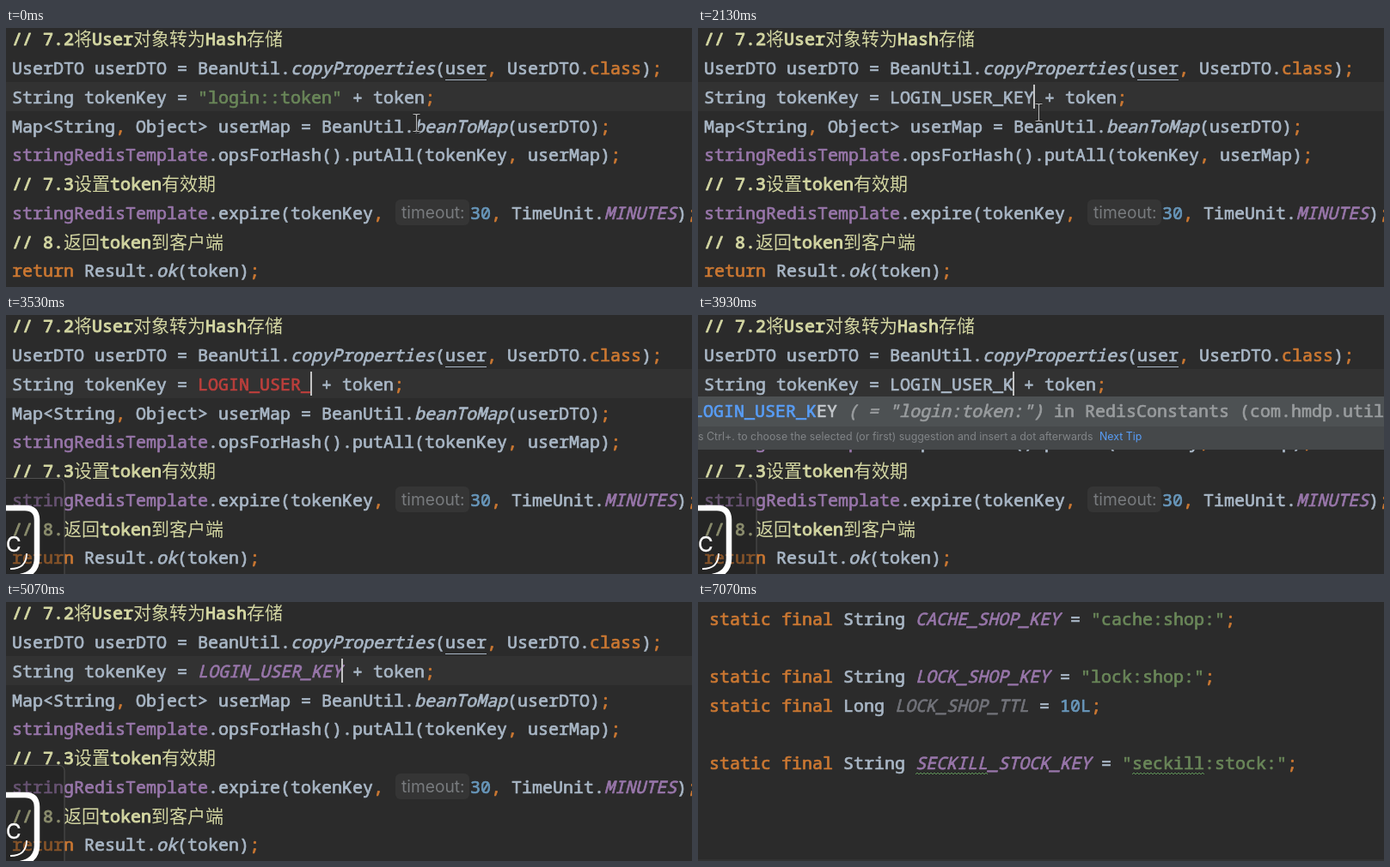
These frames come from a looping animation (798x302 px, 8 s). An HTML page with a canvas:

```html
<!DOCTYPE html>
<html lang="zh">
<head>
<meta charset="utf-8">
<title>Code editor</title>
<style>
  html, body { margin: 0; width: 100%; height: 100%; overflow: hidden; background: #2b2b2b; }
  canvas { display: block; }
</style>
</head>
<body>
<canvas id="stage" width="798" height="302"></canvas>
<script>
const ctx = document.getElementById('stage').getContext('2d');
const LOOP = 8000, TICK = 1000 / 15, CHAR = 12, VALUE_X = 223;
const MONO = '"Noto Sans Mono", "DejaVu Sans Mono", monospace';
const CJK = '"Noto Sans CJK SC", "Noto Sans CJK", sans-serif';
const UI = 'Inter, sans-serif';
const COLORS = {
  text: '#a9b7c6', key: '#cc7832', str: '#6a8759', num: '#6897bb', field: '#9876aa',
  note: '#d3d6a2', bad: '#bc3f3c', call: '#a9b7c6', constant: '#9876aa', unused: '#72737a',
  match: '#589df6', rest: '#c4c8cc', hint: '#999c9e', hintItalic: '#999c9e'
};
const ITALIC = new Set(['call', 'constant', 'unused', 'hintItalic']);

function box(x, y, w, h, color, radius = 0) {
  ctx.fillStyle = color;
  ctx.beginPath();
  ctx.roundRect(x, y, w, h, radius);
  ctx.fill();
}

// A thin outline in the same colour gives a medium weight.
function label(text, x, y, font, color, outline = 0) {
  ctx.font = font;
  ctx.fillStyle = ctx.strokeStyle = color;
  ctx.fillText(text, x, y);
  if (!outline) return;
  ctx.lineWidth = outline;
  ctx.lineJoin = 'round';
  ctx.strokeText(text, x, y);
}

// Draws pairs of style and text on one baseline.
function code(x, y, ...pairs) {
  for (let i = 0; i < pairs.length; i += 2) {
    const style = pairs[i], slant = ITALIC.has(style) ? 'italic ' : '';
    for (const run of pairs[i + 1].match(/[\u4e00-\u9fff]+|[^\u4e00-\u9fff]+/g)) {
      const wide = run >= '\u4e00';
      if (wide) label(run, x, y, `400 21px ${CJK}`, COLORS[style]);
      else label(run, x, y, `${slant}20px ${MONO}`, COLORS[style], style === 'note' ? 1 : .7);
      x += run.length * (wide ? 21 : CHAR);
    }
  }
}

function stroke(path, color, width) {
  ctx.strokeStyle = color;
  ctx.lineWidth = width;
  ctx.stroke(new Path2D(path));
}

function wave(x, y, w) {
  let path = `M${x} ${y + 2}`;
  for (let i = 2; i <= w; i += 2) path += `L${x + i} ${y + (i % 4 ? 0 : 2)}`;
  stroke(path, '#5f9458', 1);
}

// Points are [time, x, y].
const mousePath = [
  [0, 477, 110], [733, 232, 90], [800, 232, 90], [933, 227, 87],
  [1000, 227, 87], [1133, 264, 90], [1467, 396, 98]
];

function mouseAt(t) {
  t = Math.floor((t + 4) / TICK) * TICK;
  const next = mousePath.findIndex(p => p[0] > t);
  if (next < 0) return mousePath.at(-1).slice(1);
  const [t0, x0, y0] = mousePath[next - 1], [t1, x1, y1] = mousePath[next];
  let k = (t - t0) / (t1 - t0);
  if (next === 1) k = k * k * (3 - 2 * k);
  return [x0 + (x1 - x0) * k, y0 + (y1 - y0) * k];
}

function ibeam(x, y) {
  const path = `M${x - 4} ${y - 10}h3l1 1l1 -1h3M${x} ${y - 9}v18M${x - 4} ${y + 10}h3l1 -1l1 1h3`;
  stroke(path, '#202020', 3);
  stroke(path, '#b8b8b8', 1.2);
}

// Entries are [start, style, text] for the edited expression.
const edits = [
  [0, 'str', '"login::token"'], [2130, 'text', 'LOGIN_USER_KEY'], [2470, 'bad', 'LOGIN_USER_KEY'],
  [2870, 'text', 'LOGIN_USER_KE'], [3070, 'text', 'LOGIN_USER_K'], [3130, 'text', 'LOGIN_USER_'],
  [3530, 'bad', 'LOGIN_USER_'], [3870, 'text', 'LOGIN_USER_K'], [4670, 'text', 'LOGIN_USER_KEY'],
  [5070, 'constant', 'LOGIN_USER_KEY']
];

function popup() {
  box(0, 95, 798, 35, '#4d5153');
  box(0, 130, 798, 27, '#45484a');
  code(-6, 119, 'match', 'LOGIN_USER_K', 'rest', 'EY ', 'hintItalic', '( = "login:token:")',
    'hint', ' in RedisConstants (com.hmdp.util');
  label('s Ctrl+. to choose the selected (or first) suggestion and insert a dot afterwards',
    0, 146, `12.4px ${UI}`, '#818487');
  label('Next Tip', 467, 146, `12.4px ${UI}`, '#589df6');
}

function service(t) {
  const [, style, value] = edits.findLast(e => e[0] <= t);
  const [mx, my] = mouseAt(t);
  let caret = VALUE_X + value.length * CHAR;
  box(0, 63, 798, 34, '#323232');
  if (t < 2130) {
    const picked = Math.min(14, Math.max(0, Math.round((mx - VALUE_X) / CHAR)));
    caret = VALUE_X + picked * CHAR;
    if (t >= 1065) box(VALUE_X, 63, caret - VALUE_X, 34, '#214283');
  }
  code(7, 20, 'note', '// 7.2将User对象转为Hash存储');
  code(7, 54, 'text', 'UserDTO userDTO = BeanUtil.', 'call', 'copyProperties', 'text', '(user',
    'key', ', ', 'text', 'UserDTO.', 'key', 'class', 'text', ')', 'key', ';');
  box(511, 60, 48, 1, '#a9b7c6');
  code(7, 88, 'text', 'String tokenKey = ', style, value, 'text', ' + token', 'key', ';');
  code(7, 122, 'text', 'Map<String', 'key', ', ', 'text', 'Object> userMap = BeanUtil.',
    'call', 'beanToMap', 'text', '(userDTO)', 'key', ';');
  code(7, 155, 'field', 'stringRedisTemplate', 'text', '.opsForHash().putAll(tokenKey',
    'key', ', ', 'text', 'userMap)', 'key', ';');
  code(7, 189, 'note', '// 7.3设置token有效期');
  code(7, 223, 'field', 'stringRedisTemplate', 'text', '.expire(tokenKey', 'key', ',');
  box(453, 200, 86, 30, '#353535', 6);
  label('timeout:', 460, 222, `19.2px ${UI}`, '#787b7e');
  code(540, 223, 'num', '30', 'key', ', ', 'text', 'TimeUnit.', 'constant', 'MINUTES', 'text', ')', 'key', ';');
  code(7, 257, 'note', '// 8.返回token到客户端');
  code(7, 290, 'key', 'return', 'text', ' Result.', 'call', 'ok', 'text', '(token)', 'key', ';');

  if (t >= 1065 && (t < 4470 || t >= 4670)) box(caret - 1, 66, 2, 28, '#c4c4c4');
  if (t >= 3930 && t < 4670) popup();
  if (t < 2870) ibeam(Math.round(mx) + .5, Math.round(my) + .5);
}

function constants(t) {
  const declare = (y, type, style, name, valueStyle, value) =>
    code(13, y, 'key', 'static final ', 'text', type + ' ', style, name, 'text', ' = ', valueStyle, value, 'key', ';');
  box(0, 300, 798, 2, '#323232');
  declare(27, 'String', 'constant', 'CACHE_SHOP_KEY', 'str', '"cache:shop:"');
  declare(94, 'String', 'constant', 'LOCK_SHOP_KEY', 'str', '"lock:shop:"');
  declare(128, 'Long', 'unused', 'LOCK_SHOP_TTL', 'num', '10L');
  declare(195, 'String', 'constant', 'SECKILL_STOCK_KEY', 'str', '"seckill:stock:"');
  wave(253, 199, 84);
  wave(505, 199, 84);
  if (t >= 6800 && t < 7070) ibeam(371.5, t < 7000 ? 148.5 : 124.5);
}

function keycap(alpha) {
  ctx.globalAlpha = alpha;
  box(-10, 190, 78, 130, 'rgba(29,29,29,.4)', 6);
  ctx.beginPath();
  ctx.roundRect(-10, 190.5, 78, 130, 6);
  ctx.strokeStyle = '#505050';
  ctx.lineWidth = 1;
  ctx.stroke();
  stroke('M-5 225H22Q36 225 36 239V284Q36 301 17 305', '#fff', 6.5);
  stroke('M5 296Q24 296 24 278', '#fff', 1.8);
  label('C', 0, 276, `24px ${UI}`, '#fff', .4);
  ctx.globalAlpha = 1;
}

function draw() {
  const t = performance.now() % LOOP;
  box(0, 0, 798, 302, '#2b2b2b');
  (t < 6130 ? service : constants)(t);
  if (t >= 3330 && t < 6800) keycap(Math.min(1, (6800 - t) / 700));
  requestAnimationFrame(draw);
}
draw();
</script>
</body>
</html>
```
